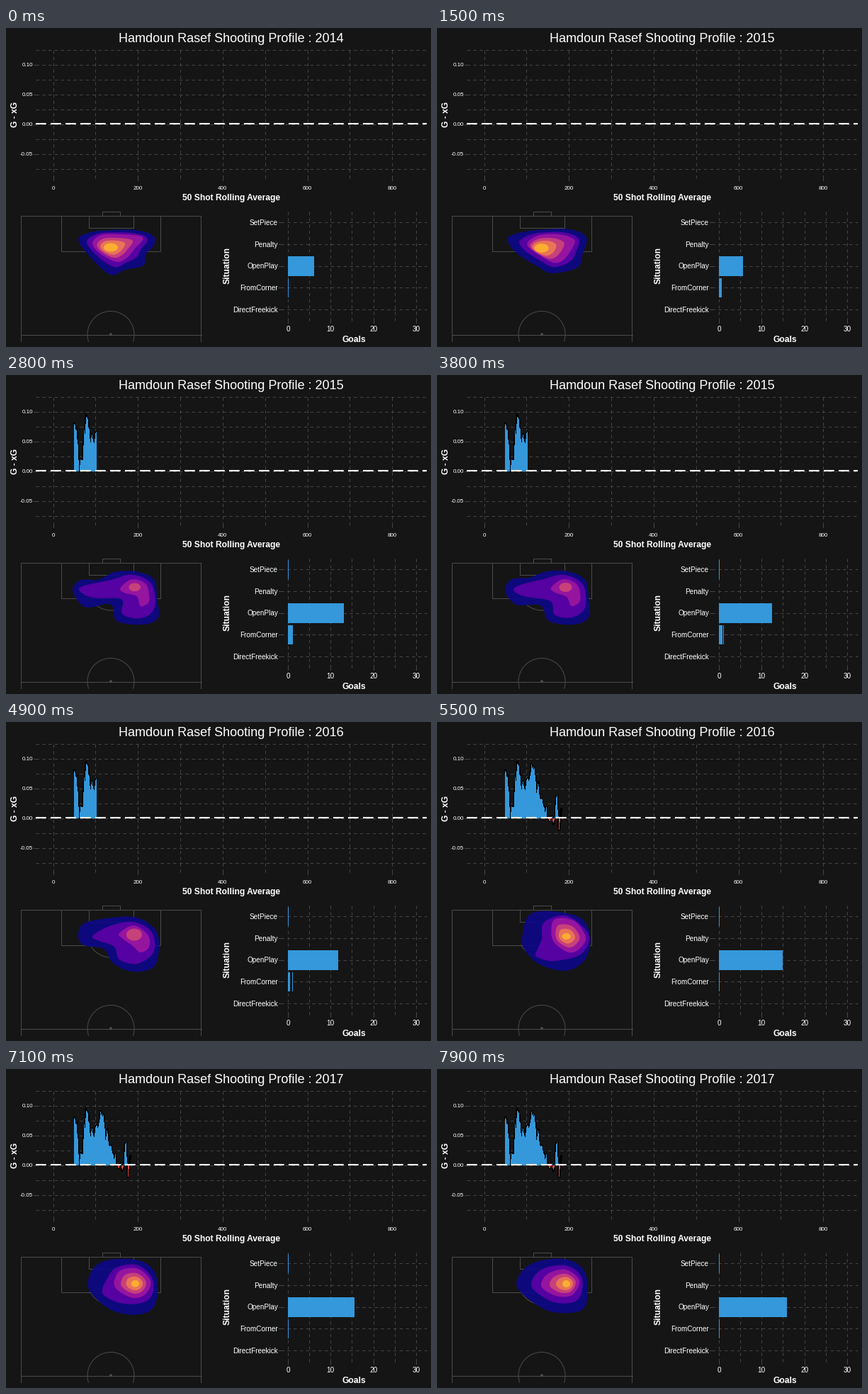
These frames come from a looping animation (600 px wide and 450 px high, 8 s). A matplotlib script:

```python
import numpy as np
import matplotlib.pyplot as plt
from matplotlib.animation import FuncAnimation
from matplotlib.patches import Circle, Polygon, Rectangle

plt.rcParams["font.family"] = "Liberation Sans"

BG, GRID, PITCH = "#151515", "#464646", "#4b4b4b"
BLUE, RED = "#3498db", "#e74c3c"
PLASMA = ["#0d0887", "#5d01a6", "#9c179e", "#cc4678", "#ed7953", "#fdb32f"]
FRAMES, STEP = 80, 100
NAME = "Hamdoun Rasef"

fig = plt.figure(figsize=(600 / 72, 450 / 72), dpi=72, facecolor=BG)
ax = fig.add_axes([0, 0, 1, 1])
ax.set_xlim(0, 600)
ax.set_ylim(450, 0)
ax.axis("off")


def line(xs, ys, color=GRID, lw=1, **kw):
    return ax.plot(xs, ys, color=color, lw=lw, **kw)[0]


def dashed(xs, ys):
    line(xs, ys, ls=(0, (4.4, 4.4)), zorder=1)


def label(x, y, s, size, ha="center", **kw):
    return ax.text(x, y, s, size=size, color="white", ha=ha, va="baseline",
                   rotation_mode="anchor", zorder=9, **kw)


# ---- rolling average panel ----
def shot_x(n):
    return 66.5 + 0.5985 * n


def diff_y(v):
    return 135.5 - 840 * v


for k in range(-3, 6):
    y = diff_y(0.025 * k)
    dashed([42, 594], [y, y])
    if k % 2 == 0:
        line([39, 42], [y, y])
        label(38, y + 3, f"{0.025 * k:.2f}", 8, "right")
for n in range(0, 900, 100):
    x = shot_x(n)
    dashed([x, x], [212, 28])
    if n % 200 == 0:
        line([x, x], [212, 215])
        label(x, 228, str(n), 8)
label(318, 243, "50 Shot Rolling Average", 12, weight="bold")
label(16, 122, "G - xG", 12, weight="bold", rotation=90)
line([42, 594], [135.3, 135.3], "white", 2.1, ls=(0, (7, 3)), zorder=6)

# (shot, thousandths of a goal)
KNOTS = np.array([
    (50, 78), (56, 70), (60, 18), (62, 0), (64, 20), (70, 18), (74, 70),
    (76, 57), (78, 97), (83, 83), (88, 48), (92, 65), (97, 45), (100, 63),
    (108, 68), (112, 89), (119, 82), (124, 46), (128, 62), (131, 36),
    (138, 32), (144, 10), (147, 18), (149, 1), (155, -5), (160, 3),
    (163, -10), (168, 4), (170, 37), (172, 36), (177, -20), (182, 15)])
shots = np.arange(50, 183)
diff = np.interp(shots, KNOTS[:, 0], KNOTS[:, 1] / 1000)
diff += np.random.default_rng(4).uniform(-0.005, 0.002, diff.size) * (diff > 0.02)


def rolling(last):
    n = last - 49
    x, v = shot_x(shots[:n]), diff[:n]
    opts = dict(step="mid", lw=0, zorder=4)
    return [line(x, diff_y(v), "black", 3.2, zorder=3),
            ax.fill_between(x, 135.5, diff_y(np.maximum(v, 0)), color=BLUE, **opts),
            ax.fill_between(x, 135.5, diff_y(np.minimum(v, 0)), color=RED, **opts)]


history = [[], rolling(102), rolling(182)]

# ---- goals panel ----
ROWS = ["SetPiece", "Penalty", "OpenPlay", "FromCorner", "DirectFreekick"]
GOAL = 6.03


def row_y(i):
    return 274.3 + 30.7 * i


for i, name in enumerate(ROWS):
    y = row_y(i)
    dashed([388, 594], [y, y])
    line([385, 388], [y, y])
    label(384, y + 3.7, name, 10, "right")
for g in range(0, 31, 5):
    x = 398 + GOAL * g
    dashed([x, x], [413, 258])
    if g % 10 == 0:
        line([x, x], [413, 416])
        label(x, 428.5, str(g), 10)
label(491, 443, "Goals", 12, weight="bold")
label(316, 335, "Situation", 12, weight="bold", rotation=90)


def bar(row, x=398):
    r = Rectangle((x, row_y(row) - 13.8), 1, 27.7, color=BLUE, lw=0, zorder=3)
    return ax.add_patch(r)


set_piece, open_play, corner = bar(0), bar(2), bar(3)
corner_edge = bar(3, 404)


# ---- pitch ----
def arc(cx, cy, r, a, b):
    th = np.radians(np.linspace(a, b, 80))
    line(cx + r * np.cos(th), cy + r * np.sin(th), PITCH)


def box(half, y0, y1):
    x0, x1 = 148 - half, 148 + half
    line([x0, x0, x1, x1], [y0, y1, y1, y0], PITCH)


box(127, 442, 264.5)
box(12.5, 264.5, 258.5)
box(31.5, 264.5, 281.5)
box(70, 264.5, 314.5)
line([21.5, 275.5], [432.5, 432.5], PITCH)
arc(148, 432.5, 33, 163, 377)
arc(148, 299, 33, 28, 152)
ax.add_patch(Circle((148, 432.3), 2, color=PITCH, lw=0))


# ---- shot density ----
def resample(q, n=120):
    q = np.vstack([q, q[:1]])
    s = np.r_[0, np.cumsum(np.hypot(*np.diff(q, axis=0).T))]
    at = np.linspace(0, s[-1], n, endpoint=False)
    return np.column_stack([np.interp(at, s, c) for c in q.T])


def smooth(points):
    """Closed Catmull-Rom curve, evenly spaced along its length."""
    b = np.array(points, float)
    a, c, d = np.roll(b, 1, 0), np.roll(b, -1, 0), np.roll(b, -2, 0)
    t = np.linspace(0, 1, 12, endpoint=False)[:, None, None]
    q = b + 0.5 * t * (c - a + t * (2 * a - 5 * b + 4 * c - d
                                    + t * (3 * b - a - 3 * c + d)))
    return resample(q.swapaxes(0, 1).reshape(-1, 2))


def ellipse(cx, cy, rx, ry):
    th = np.linspace(0, 2 * np.pi, 120, endpoint=False)
    return resample(np.column_stack([cx - rx * np.cos(th), cy - ry * np.sin(th)]))


def mix(a, b, w):
    return a + w * (b - a)


def contours(outer, middle, core, second=None, peaked=True):
    """Nested levels; those not given are blended from their neighbours."""
    o, m, c = smooth(outer), smooth(middle), ellipse(*core)
    s = smooth(second) if second else mix(o, m, 0.6)
    return [o, s, m] + ([mix(m, c, 0.4), mix(m, c, 0.7)] if peaked else []) + [c]


first_a = contours(
    [(102, 298), (120, 288), (150, 285), (184, 285), (208, 293), (209, 306),
     (197, 320), (194, 335), (168, 341), (147, 348), (118, 322)],
    [(122, 304), (134, 292), (160, 291), (193, 295), (182, 311), (172, 323),
     (157, 330), (134, 319)],
    (148, 309.5, 10, 6))
first_b = contours(
    [(98, 299), (108, 291), (138, 285), (185, 283), (210, 293), (210, 312),
     (203, 338), (170, 347), (143, 333), (112, 318)],
    [(130, 306), (147, 293), (175, 291), (195, 302), (187, 324), (172, 333),
     (150, 321)],
    (147.5, 311, 10, 6.5))
second_a = contours(
    [(96, 304), (106, 288), (130, 286), (155, 277), (185, 277), (209, 289),
     (214, 315), (214, 342), (192, 352), (158, 347), (146, 325), (112, 324)],
    [(161, 300), (178, 288), (198, 296), (202, 318), (190, 326), (183, 313),
     (167, 307)],
    (181.5, 299.5, 9, 6.5),
    [(108, 303), (118, 296), (150, 288), (180, 282), (206, 296), (209, 328),
     (190, 342), (166, 338), (160, 319), (122, 312)], peaked=False)
second_b = contours(
    [(102, 302), (110, 284), (150, 276), (185, 276), (211, 293), (216, 318),
     (208, 346), (178, 352), (151, 340), (138, 320), (110, 315)],
    [(160, 298), (180, 287), (200, 300), (202, 317), (190, 325), (178, 315),
     (164, 305)],
    (181, 300, 11, 8.5),
    [(122, 302), (146, 288), (180, 282), (206, 297), (208, 325), (185, 341),
     (160, 335), (153, 317), (132, 309)], peaked=False)
third_a = contours(
    [(120, 300), (130, 273), (160, 267), (202, 276), (216, 303), (209, 335),
     (183, 350), (146, 342), (123, 320)],
    [(160, 298), (166, 279), (193, 281), (209, 303), (201, 319), (186, 325),
     (166, 313)],
    (182.5, 302.5, 6, 4.5),
    [(141, 319), (147, 305), (152, 282), (184, 274), (213, 300), (203, 327),
     (165, 336), (140, 329)])
third_b = contours(
    [(112, 303), (124, 281), (148, 270), (185, 269), (209, 287), (212, 325),
     (200, 342), (160, 342), (126, 322)],
    [(147, 302), (158, 288), (182, 283), (201, 298), (192, 318), (172, 321),
     (152, 312)],
    (182.5, 303, 5.5, 5))

# time a, time b, contours a, contours b, open-play goals, corner goals
SEASONS = [
    (0.0, 2.3, first_a, first_b, (6.1, 5.3), (0.12, 1.0)),
    (3.8, 4.9, second_a, second_b, (12.45, 11.75), (0.88, 0.48)),
    (6.0, 7.9, third_a, third_b, (15.2, 15.95), (0.15, 0.15))]

blobs = [ax.add_patch(Polygon([(0, 0), (1, 0), (0, 1)], closed=True, color=c,
                              alpha=0.92, lw=0, zorder=5)) for c in PLASMA]
title = label(318, 20, "", 18)


def update(i):
    t = i * STEP / 1000
    k = (i >= 28) + (i >= 55)
    year = 2014 + (i >= 14) + (i >= 41) + (i >= 68)
    title.set_text(f"{NAME} Shooting Profile : {year}")

    t0, t1, first, last, goals, corners = SEASONS[k]
    u = (t - t0) / (t1 - t0)
    open_play.set_width(GOAL * mix(*goals, u))
    corner.set_width(GOAL * mix(*corners, u))
    set_piece.set_visible(k > 0)
    corner_edge.set_visible(k == 1)

    for j, group in enumerate(history):
        for artist in group:
            artist.set_visible(j == k)

    w = u if u > 0 else 0.4 * u  # contours start each season slowly
    for j, blob in enumerate(blobs):
        blob.set_visible(j < len(first))
        if j < len(first):
            blob.set_xy(mix(first[j], last[j], w))
    return []


anim = FuncAnimation(fig, update, frames=FRAMES, interval=STEP,
                     repeat=True, repeat_delay=0)
plt.show()
```
